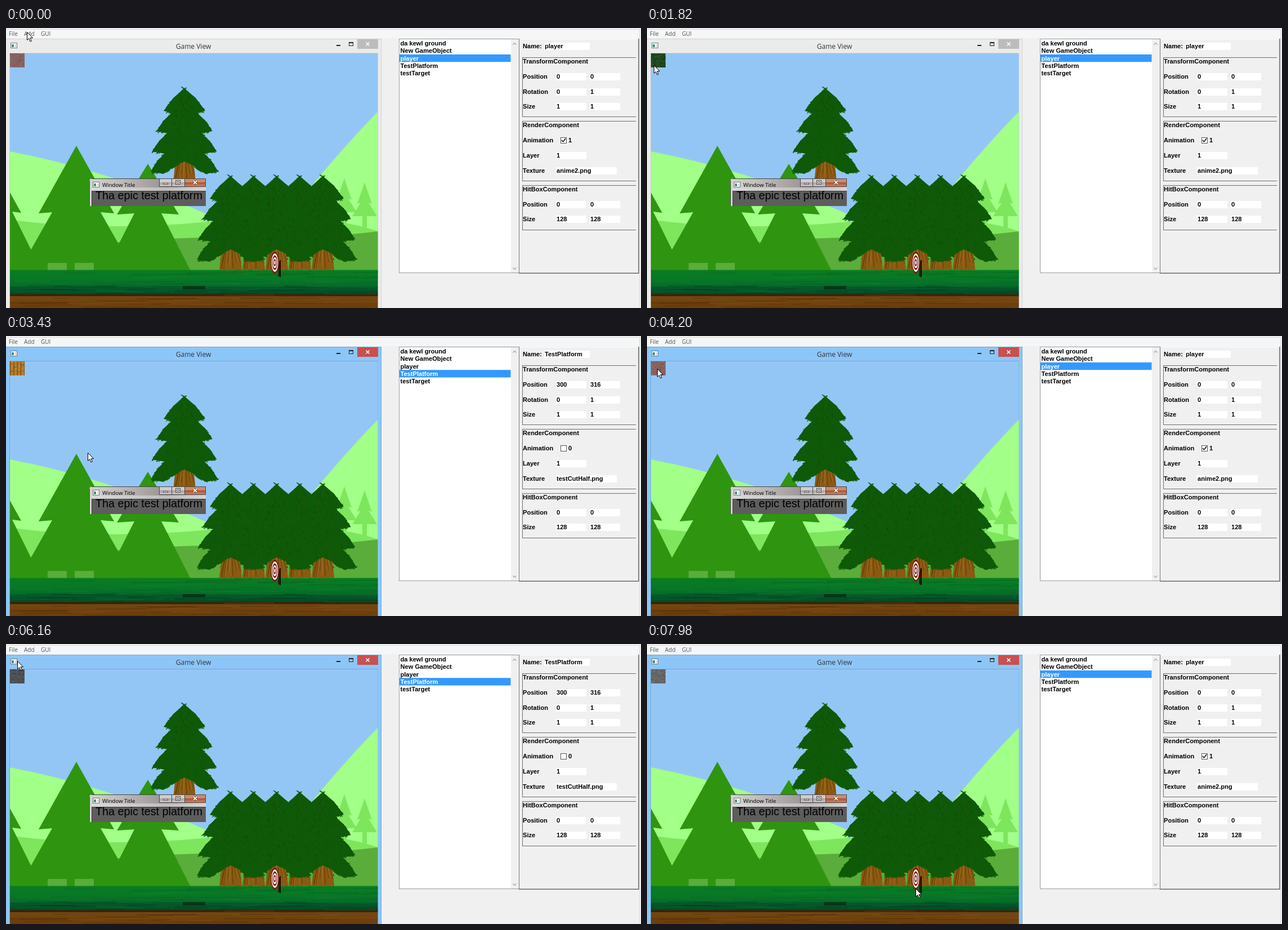
These frames come from a looping animation (1128x497 px, 8000 ms). An HTML page with a canvas:

```html
<!DOCTYPE html>
<html lang="en">
<head>
<meta charset="utf-8">
<title>Game editor</title>
<style>
html, body { margin: 0; width: 100%; height: 100%; overflow: hidden; background: #f0f0f0; }
canvas { display: block; width: 1128px; height: 497px; }
</style>
</head>
<body>
<canvas id="stage" width="1128" height="497"></canvas>
<script>
const W = 1128, H = 497, LOOP = 8000, STEP = 70;
const UI = '"Open Sans", "Noto Sans", sans-serif';
const BOLD = 'bold 11.1px "Liberation Sans", Arial, sans-serif';
const LIME = '#a2ff87', MINT = '#7ee65d', MEADOW = '#5aad3a', FLAT = '#2f9510', LEAF = '#0f5a08';
let g = document.getElementById('stage').getContext('2d');

function random(seed) {
  return () => {
    seed = (seed * 1664525 + 1013904223) >>> 0;
    return seed / 4294967296;
  };
}

function rect(x, y, w, h, color) {
  g.fillStyle = color;
  g.fillRect(x, y, w, h);
}

function frame(x, y, w, h, color) {
  g.strokeStyle = color;
  g.lineWidth = 1;
  g.strokeRect(x + .5, y + .5, w - 1, h - 1);
}

function poly(color, points) {
  g.fillStyle = color;
  g.beginPath();
  for (const [x, y] of points) g.lineTo(x, y);
  g.closePath();
  g.fill();
}

function line(color, width, x1, y1, x2, y2) {
  g.strokeStyle = color;
  g.lineWidth = width;
  g.beginPath();
  g.moveTo(x1, y1);
  g.lineTo(x2, y2);
  g.stroke();
}

function cross(color, width, x, y, r) {
  line(color, width, x - r, y - r, x + r, y + r);
  line(color, width, x + r, y - r, x - r, y + r);
}

function text(s, x, y, font = BOLD, color = '#000', align = 'left') {
  g.font = font;
  g.fillStyle = color;
  g.textAlign = align;
  g.fillText(s, x, y);
}

function gradient(x1, y1, x2, y2, ...colors) {
  const fill = g.createLinearGradient(x1, y1, x2, y2);
  colors.forEach((c, i) => fill.addColorStop(i / (colors.length - 1), c));
  return fill;
}

function layer(w, h, draw) {
  const c = document.createElement('canvas');
  c.width = w;
  c.height = h;
  const old = g;
  g = c.getContext('2d');
  draw();
  g = old;
  return c;
}

const mirror = side => [...side, ...side.map(([x, y]) => [-x, y]).reverse()];

// Right side of a leafy tree: four drooping tiers below the peak
function leafSide() {
  const side = [[0, 0]];
  for (let i = 0; i < 4; i++) {
    const [px, py] = side.at(-1);
    const x = 60 - 23 * ((3 - i) / 3) ** 2, y = 40 + 36 * i;
    side.push([px + (x - px) * .54, py + (y - py) * .43], [x, y], [x * .62, y + 4]);
  }
  side.push([15, 137], [0, 130]);
  return side;
}

function leafTree() {
  const rnd = random(7), side = leafSide();
  g.translate(70, 4);
  poly('#8a5a12', mirror([[15, 120], [20, 166]]));
  for (let i = 0; i < 16; i++) {
    const x = rnd() * 30 - 15;
    line(i % 3 ? '#6b450c' : '#9c6a1c', 1.2, x * .7, 126, x * 1.25, 142 + rnd() * 24);
  }
  poly(LEAF, mirror(side));
  side.slice(1, -1).forEach(([x, y], i) => {
    const [px, py] = side[i];
    for (let k = 0; k < 10; k++) {
      const u = rnd(), ex = px + (x - px) * u, ey = py + (y - py) * u;
      const s = k % 2 ? 1 : -1;
      line(LEAF, 1.4, s * (ex - 6), ey - 3, s * (ex + rnd() * 2), ey + rnd() * 3);
    }
  });
  g.globalAlpha = .45;
  for (let i = 0; i < 220; i++) {
    const y = 12 + rnd() * 118, x = (rnd() * 2 - 1) * (4 + y * .3);
    line(i % 4 ? '#0a4a06' : '#33500a', 1, x, y, x + Math.sign(x) * rnd() * 6, y + 5);
  }
  g.globalAlpha = 1;
  cross(LEAF, 1.2, 0, 1, 2.2);
}

function flatTree(x, top, tip, tipY, notch, base, color = FLAT, bottom = 431) {
  const side = [[0, top], [tip, tipY], [notch, tipY - 2], [base, bottom]];
  poly(color, mirror(side).map(([dx, y]) => [x + dx, y]));
}

function farTree(x, y) {
  flatTree(x, y, 13, y + 38, 7, 22, MINT, y + 60);
  rect(x - 4, y + 58, 8, 30, MINT);
}

function hill(color, x, y, cx, cy, ex, ey) {
  g.fillStyle = color;
  g.beginPath();
  g.moveTo(x, y);
  g.quadraticCurveTo(cx, cy, ex, ey);
  g.lineTo(ex, 440);
  g.lineTo(x, 440);
  g.fill();
}

function streaks(n, y, h, ...colors) {
  const rnd = random(y);
  g.globalAlpha = .4;
  for (let i = 0; i < n; i++) {
    const x = rnd() * 650, sy = y + rnd() * h;
    line(colors[i % colors.length], 1 + rnd(), x, sy, x + 30 + rnd() * 90, sy + rnd() * 2 - 1);
  }
  g.globalAlpha = 1;
}

function ground() {
  rect(7, 429.5, 654, 30, gradient(0, 430, 0, 459, '#0a7b22', '#087826', '#066a2a'));
  rect(7, 459, 654, 14, gradient(0, 459, 0, 473, '#055a2a', '#064826'));
  rect(7, 472, 654, 5, '#33270b');
  rect(7, 476, 654, 21, gradient(0, 476, 0, H, '#754611', '#6a3d0b'));
  streaks(40, 431, 26, '#0c8628', '#05601f');
  streaks(36, 456, 16, '#076c2c', '#03381c');
  streaks(40, 474, 22, '#83521a', '#4c2a07');
  rect(314, 458, 40, 6, '#07351a');
}

function target() {
  line('#2a0d08', 2, 484.5, 414, 484.5, 441);
  line('#160705', 2, 487, 412, 487, 442);
  for (let i = 0; i < 6; i++) {
    const k = 1 - i / 6;
    g.fillStyle = i % 2 ? '#fff' : '#7c1a0d';
    g.beginPath();
    g.ellipse(477.5, 416.5, 7 * k, 19.5 * k, 0, 0, 7);
    g.fill();
  }
}

function glass(x, w, light, dark) {
  rect(x, 267, w, 15, light);
  rect(x, 274, w, 8, gradient(0, 274, 0, 282, dark, light));
  frame(x, 267, w, 15, '#4c4646');
}

function platform() {
  g.fillStyle = gradient(148, 0, 355, 0, '#d5d3d3', '#b9b4b3', '#989292', '#c9c6c5');
  g.beginPath();
  g.roundRect(148, 267, 207, 49, [5, 3, 0, 0]);
  g.fill();
  line('#444', 1, 152, 267.5, 354, 267.5);
  line('#555', 1, 148.5, 271, 148.5, 316);
  rect(152, 283, 203, 7, 'rgba(225,225,225,.55)');
  rect(152, 289, 203, 27, '#3c3c3c');
  rect(153, 290, 202, 26, '#5d5d5d');
  appIcon(154, 273);
  text('Window Title', 171, 281.5, '9.7px ' + UI);
  glass(272, 23, '#cfcccb', '#a6a2a1');
  glass(294, 24, '#cfcccb', '#a6a2a1');
  glass(317, 38, '#cd8a6c', '#a9502c');
  rect(279, 275, 9, 3, '#fff');
  frame(279, 275, 9, 3, '#555');
  rect(301, 270, 9, 8, '#fff');
  frame(301, 270, 9, 8, '#444');
  frame(303, 272, 5, 4, '#444');
  cross('#4b302a', 3.4, 336, 274, 3);
  cross('#fff', 1.8, 336, 274, 3);
  text('Tha epic test platform', 159, 304, '19.75px "Liberation Sans", Arial, sans-serif');
}

function appIcon(x, y) {
  rect(x, y, 12, 10, '#fff');
  frame(x, y, 12, 10, '#777');
  rect(x + 2, y + 3, 4, 5, '#3c8f86');
  rect(x + 8, y + 3, 2, 5, '#cdd3da');
}

function scene() {
  g.beginPath();
  g.rect(7, 45, 653.5, 452);
  g.clip();
  rect(7, 45, 654, 452, '#94c6f5');
  hill(LIME, 7, 219, 180, 252, 356, 330);
  hill(LIME, 661, 148, 590, 220, 500, 333);
  farTree(601, 267);
  farTree(637, 274);
  hill(MINT, 7, 340, 160, 362, 360, 344);
  hill(MINT, 360, 344, 560, 325, 661, 361);
  hill(MEADOW, 7, 400, 200, 376, 345, 372);
  hill(MEADOW, 345, 372, 520, 378, 661, 361);
  flatTree(-39, 209, 66, 328, 50, 102);
  flatTree(125, 209, 67, 329, 43, 102);
  flatTree(252, 241, 55, 331, 24, 76);
  for (const x of [74, 122]) rect(x, 417, 34, 14, MEADOW);

  const tree = layer(140, 175, leafTree);
  g.drawImage(tree, 247, 103);
  ground();
  for (const i of [1, 3, 2, 4, 0]) g.drawImage(tree, 329 + i * 41, 259);
  // Shade over the row and roots fading into the grass
  const rnd = random(3);
  for (let i = 0; i < 60; i++) {
    const x = 378 + rnd() * 205;
    line(i % 2 ? '#0a7524' : '#3c6414', 1, x, 429, x, 431 + rnd() * 6);
  }
  g.globalAlpha = .35;
  for (let i = 0; i < 200; i++) {
    const x = 385 + rnd() * 190, y = 300 + rnd() * 92;
    line(i % 3 ? '#0a460a' : '#2c500a', 1.2, x, y, x + rnd() * 8 - 4, y + 5);
  }
  g.globalAlpha = 1;
  target();
  platform();
}

// Square sprite cell: noisy stone, or boards when asked for
function cell(color, seed, boards) {
  const rnd = random(seed * 977 + 5), px = 26 / 16;
  rect(0, 0, 26, 26, color);
  for (let i = 0; i < 256; i++) {
    const shade = rnd() < .5 ? '0,0,0' : '255,255,255';
    rect(i % 16 * px, (i >> 4) * px, px, px, `rgba(${shade},${rnd() * .12})`);
  }
  for (let x = 0; boards && x < 26; x += 6.3) {
    rect(x, 0, 1.2, 26, '#70460f');
    rect(x, 4 + rnd() * 18, 6, 1.2, '#80531a');
  }
}

const COLORS = '#876260 #7d6048 #7a7a7a #898989 #666 #767676 #1d461d #5c5846 #4a4e52 #ba802a'.split(' ');
const cells = COLORS.map((c, i) => layer(26, 26, () => cell(c, i, i === 9)));
const backdrop = layer(W, H, scene);

function gameView(active, step) {
  const edge = active ? '#74a8d4' : '#d2d2d2';
  rect(0, 19, 667, 478, active ? '#8cc6f8' : '#ebebeb');
  line(edge, 1, 0, 19.5, 667, 19.5);
  line(edge, 1, 666.5, 19, 666.5, H);
  frame(6, 44, 655, 460, edge);
  text('Game View', 333, 36.5, '12px ' + UI, '#333', 'center');
  appIcon(8, 26);
  rect(587, 30, 7, 2, '#222');
  frame(609, 25, 8, 7, '#222');
  rect(609, 25, 8, 2, '#222');
  rect(624, 20, 37, 17, active ? '#c75050' : '#bcbcbc');
  cross('#fff', 1.4, 642.5, 28.5, 3);
  g.drawImage(backdrop, 0, 0);
  g.drawImage(cells[step % cells.length], 7, 45, 26, 25);
}

function chevron(x, y, d) {
  line('#a0a0a0', 1.3, x - 3, y + d, x, y - d);
  line('#a0a0a0', 1.3, x, y - d, x + 3, y + d);
}

function objectList(selected) {
  rect(698, 19, 214, 416, '#fff');
  frame(698, 19, 214, 416, '#989ca2');
  rect(897, 20, 14, 414, '#f0f0f0');
  chevron(903.5, 28, 1.6);
  chevron(903.5, 427, -1.6);
  ['da kewl ground', 'New GameObject', 'player', 'TestPlatform', 'testTarget'].forEach((name, i) => {
    const y = 20.3 + i * 13.3, on = name === selected;
    if (on) rect(699, y, 197.5, 13.3, '#3399ff');
    text(name, 700.5, Math.round(y + 10.7), BOLD, on ? '#fff' : '#000');
  });
}

function field(s, x, y, w = 54) {
  rect(x, y - 10, w, 13, '#fff');
  text(s, x + 1, y);
}

function row(label, y, ...values) {
  text(label, 918, y);
  values.forEach((v, i) => field(v, 977 + i * 60, y));
}

function group(title, y, h) {
  line('#6e6e6e', 1, 917, y + .5, 1119, y + .5);
  line('#6e6e6e', 1, 917, y + h + .5, 1119, y + h + .5);
  line('#6e6e6e', 1, 917.5, y, 917.5, y + h);
  text(title, 918, y + 11);
}

function inspector(selected) {
  const isPlayer = selected === 'player';
  line('#fff', 1, 912, 19.5, 1124, 19.5);
  line('#777', 1, 911.5, 19, 911.5, 435);
  line('#696969', 1.5, 1123.8, 19, 1123.8, 436);
  line('#696969', 1.5, 911, 435.2, 1124, 435.2);
  text('Name:', 918, 36);
  field(selected, 956, 36, 81);
  group('TransformComponent', 52, 105);
  row('Position', 90, isPlayer ? '0' : '300', isPlayer ? '0' : '316');
  row('Rotation', 117, '0', '1');
  row('Size', 143, '1', '1');
  group('RenderComponent', 165, 106);
  text('Animation', 918, 203);
  rect(985, 194, 11, 11, '#fff');
  frame(985, 194, 11, 11, '#555');
  if (isPlayer) {
    line('#111', 1.6, 987, 199, 989.5, 202);
    line('#111', 1.6, 989.5, 202, 994, 196);
  }
  text(isPlayer ? '1' : '0', 999, 203);
  row('Layer', 230, '1');
  text('Texture', 918, 257);
  field(isPlayer ? 'anime2.png' : 'testCutHalf.png', 977, 257, 108);
  group('HitBoxComponent', 279, 79);
  row('Position', 317, '0', '0');
  row('Size', 343, '128', '128');
}

// Pointer moves: start, end, x, y
const MOVES = [
  [560, 1120, 38, 100], [1330, 1820, 12, 66], [2030, 2310, 36, 75], [2310, 2940, 199, 271],
  [3220, 3800, 18, 58], [4200, 4900, 168, 254], [4900, 5040, 173, 273], [5180, 5600, 23, 52],
  [5670, 5950, 14, 1], [5950, 6160, 20, 30], [6300, 6510, 22, 58], [6720, 7630, 442, 381],
  [7700, 7980, 477, 434]
];

function pointerAt(t) {
  let x = 37, y = 7;
  for (const [from, to, tx, ty] of MOVES) {
    const u = Math.min(1, Math.max(0, (t - from) / (to - from))), k = u * u * (3 - 2 * u);
    x += (tx - x) * k;
    y += (ty - y) * k;
  }
  return [Math.round(x) + .5, Math.round(y) + .5];
}

function pointer(x, y) {
  g.save();
  g.translate(x, y);
  poly('#fff', [[0, 0], [0, 14], [3.2, 11], [5.5, 16.5], [7.8, 15.5], [5.5, 10.2], [10, 10.2]]);
  g.strokeStyle = '#000';
  g.lineWidth = 1;
  g.stroke();
  g.restore();
}

function chrome() {
  rect(0, 0, W, H, '#f0f0f0');
  rect(0, 2, W, 1, '#dcdcdc');
  rect(0, 3, 1125, 15, '#f5f6f7');
  line('#dedede', 1, 1125.5, 2, 1125.5, H);
  const font = '10px ' + UI;
  text('File', 5, 14, font, '#555');
  text('Add', 32, 14, font, '#555');
  text('GUI', 62, 14, font, '#555');
}

function draw(now) {
  const step = Math.floor(now % LOOP / STEP), t = step * STEP;
  const onPlatform = (t >= 2940 && t < 4200) || (t >= 5110 && t < 6580);
  const selected = onPlatform ? 'TestPlatform' : 'player';
  chrome();
  gameView(t >= 1960, step);
  objectList(selected);
  inspector(selected);
  pointer(...pointerAt(t));
}

const start = performance.now();
function tick() {
  draw(performance.now() - start);
  requestAnimationFrame(tick);
}
tick();
</script>
</body>
</html>
```
